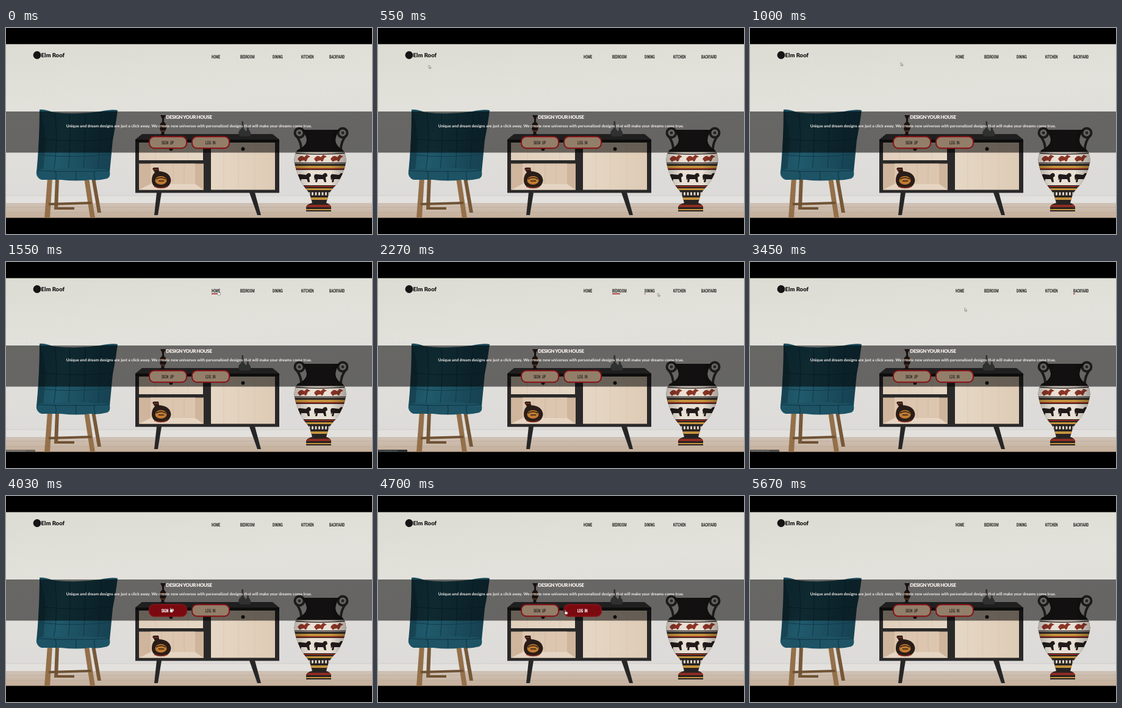
An HTML page that plays this animation: 600 px wide and 338 px high, repeating every 5.79 s.

```html
<!DOCTYPE html>
<html lang="en">
<head>
<meta charset="utf-8">
<title>Home design landing page</title>
<style>
html, body { margin: 0; width: 100%; height: 100%; overflow: hidden; background: #000; }
svg { display: block; width: 100vw; height: 100vh; }
text { font-family: Lato, "Open Sans", sans-serif; text-rendering: geometricPrecision; }
.title, .lead { fill: #f6f0ec; text-anchor: middle; }
.title { font-size: 8px; font-weight: 900; letter-spacing: -.48px; }
.lead { font-size: 6.5px; font-weight: 700; letter-spacing: .04px; }
.brand { font-size: 9.5px; font-weight: 900; fill: #151515; }
.narrow text { font: 700 8px Roboto, "Liberation Sans", sans-serif; fill: #1c1c1b; transform: scaleX(.62); transform-box: fill-box; }
.btn text { font-weight: 500; word-spacing: 2px; transform-origin: center; text-anchor: middle; }
.btn rect { fill: #937e69; stroke: #881115; stroke-width: 2; }
.status text { font: 3.4px "Liberation Sans", sans-serif; fill: #8b8f90; }

/* One shared clock for every moving part */
.bar, .btn rect, .btn text, .status, .cursor, .arrow, .hand {
  animation: 5790ms linear infinite;
}
.bar { fill: #a8191c; transform-box: fill-box; transform-origin: left; transform: scaleX(0); }
.bar.home { animation-name: home; }
.bar.bedroom { animation-name: bedroom; }
.bar.dining { animation-name: dining; }
.bar.kitchen { animation-name: kitchen; }
.bar.backyard { animation-name: backyard; }
@keyframes home { 0%, 21.2%, 34.5%, 100% { transform: scaleX(0); } 26.4%, 29.4% { transform: scaleX(1); } }
@keyframes bedroom { 0%, 30.7%, 42%, 100% { transform: scaleX(0); } 36.6%, 36.8% { transform: scaleX(1); } 39.2% { transform: scaleX(.56); } }
@keyframes dining { 0%, 38.3%, 40.2%, 100% { transform: scaleX(0); } 39.2% { transform: scaleX(.08); } }
@keyframes kitchen { 0%, 41.8%, 47.3%, 100% { transform: scaleX(0); } 44.2% { transform: scaleX(.55); } }
@keyframes backyard { 0%, 46.3%, 60.8%, 100% { transform: scaleX(0); } 51.8%, 54.1% { transform: scaleX(1); } 59.6% { transform: scaleX(.1); } }

.signup rect { animation-name: signup; }
.signup text { animation-name: signup-ink; }
.login rect { animation-name: login; }
.login text { animation-name: login-ink; }
@keyframes signup { 0%, 66.5%, 79.6%, 100% { fill: #937e69; } 68.5%, 77.4% { fill: #7b0910; } }
@keyframes signup-ink { 0%, 66.5%, 79.6%, 100% { fill: #1c1c1b; font-weight: 500; } 68.5%, 77.4% { fill: #fff; font-weight: 800; } }
@keyframes login { 0%, 79.2%, 91.8%, 100% { fill: #937e69; } 80.9%, 89.8% { fill: #7b0910; } }
@keyframes login-ink { 0%, 79.2%, 91.8%, 100% { fill: #1c1c1b; font-weight: 500; } 80.9%, 89.8% { fill: #fff; font-weight: 800; } }

.status { animation-name: status; }
@keyframes status { 0%, 24%, 63%, 100% { opacity: 0; } 26.7% { opacity: .55; } 30%, 57% { opacity: 1; } 59.6% { opacity: .75; } }

.cursor { animation-name: travel; }
@keyframes travel {
  0%, 4.3% { transform: translate(-8px, 80px); }
  9.5% { transform: translate(83px, 61px); }
  13% { transform: translate(150px, 64px); }
  21.2% { transform: translate(336px, 50px); }
  26.8% { transform: translate(347px, 47px); }
  29.4% { transform: translate(353px, 48px); }
  30.7% { transform: translate(383px, 49px); }
  36.8% { transform: translate(408px, 49px); }
  39.2% { transform: translate(458.5px, 51px); }
  41.8% { transform: translate(484px, 49px); }
  44.2% { transform: translate(505px, 49px); }
  46.3% { transform: translate(530px, 48px); }
  51.8% { transform: translate(545px, 48px); }
  54.1% { transform: translate(530px, 54px); }
  59.6%, 60.8% { transform: translate(352px, 75.5px); }
  66.5% { transform: translate(268px, 178px); }
  71.7% { transform: translate(270px, 187px); }
  77.4% { transform: translate(296px, 188px); }
  81.2%, 81.7% { transform: translate(306.5px, 187px); }
  88.1% { transform: translate(335px, 192px); }
  89.8% { transform: translate(345px, 198px); }
  94.1%, 100% { transform: translate(385px, 316px); }
}
.arrow { animation-name: arrow; animation-timing-function: step-end; }
.hand { animation-name: hand; animation-timing-function: step-end; }
@keyframes arrow {
  0%, 29.4%, 36.8%, 39%, 44.2%, 54.1%, 77.4%, 89.8%, 100% { opacity: 1; }
  21.2%, 30.7%, 38.3%, 41.8%, 46.3%, 66.5%, 79.4% { opacity: 0; }
}
@keyframes hand {
  0%, 29.4%, 36.8%, 39%, 44.2%, 54.1%, 77.4%, 89.8%, 100% { opacity: 0; }
  21.2%, 30.7%, 38.3%, 41.8%, 46.3%, 66.5%, 79.4% { opacity: 1; }
}
</style>
</head>
<body>
<svg viewBox="0 0 600 338" preserveAspectRatio="none">
  <defs>
    <linearGradient id="wall" x2=".25" y2="1">
      <stop stop-color="#dddcd3"/><stop offset=".45" stop-color="#e2e1db"/><stop offset="1" stop-color="#dddbd9"/>
    </linearGradient>
    <linearGradient id="floor" x2="0" y2="1">
      <stop stop-color="#d0c3b7"/><stop offset="1" stop-color="#c4ae99"/>
    </linearGradient>
    <linearGradient id="cloth" x2="1" y2=".2">
      <stop stop-color="#1a4b5b"/><stop offset=".4" stop-color="#205a6c"/><stop offset="1" stop-color="#174353"/>
    </linearGradient>
    <linearGradient id="oak" x2="1" y2="0">
      <stop stop-color="#e0cfbb"/><stop offset=".5" stop-color="#e6d8c6"/><stop offset="1" stop-color="#decbb5"/>
    </linearGradient>
    <linearGradient id="shade" x2="1" y2="0">
      <stop stop-opacity=".22"/><stop offset=".3" stop-opacity="0"/><stop offset=".7" stop-opacity="0"/><stop offset="1" stop-opacity=".28"/>
    </linearGradient>
    <clipPath id="page"><path d="M0 26.500H600V311.500H0Z"/></clipPath>
    <path id="urn" d="M484 167H548Q541 174 540 184Q541 194 552 200Q559 208 557 222Q552 246 537 262Q529 270 527 280L525 287Q532 289 533 294V301H492V294Q493 289 502 287L500 280Q498 270 490 262Q478 246 473 222Q471 208 478 200Q492 194 493 184Q492 174 484 167Z"/>
    <clipPath id="urn-clip"><use href="#urn"/></clipPath>
    <path id="bull" d="M0 4Q1 0 5 1L14 2Q17-3 21 0L22 4L19 6L20 14H17L15 9L6 9L5 14H2L3 8L1 11Z"/>
    <path id="bird" d="M0 7Q5-1 11 4L15 0L21 3L17 5L14 11H12L11 9L6 10L4 12Z"/>
  </defs>

  <rect width="600" height="338"/>
  <g clip-path="url(#page)">
    <path fill="url(#wall)" d="M0 26H600V276H0Z"/>
    <path fill="#e3e1de" d="M0 275H600V288H0Z"/>
    <path stroke="#cbc8c4" stroke-width=".8" d="M0 275H600"/>
    <path fill="url(#floor)" d="M0 287.500H600V312H0Z"/>
    <path stroke="#a58f7b" stroke-width=".6" opacity=".5" d="M0 288H600M0 294H600M0 303H600"/>

    <!-- armchair -->
    <g fill="#94704a">
      <path fill="#765838" d="M81 246H87L85 298H79ZM140 246H146L156 303H150Z"/>
      <path d="M68 246H76L72 312H63ZM128 246H136L146 312H138Z"/>
      <path fill="#6f5234" d="M70 287L140 285V289L70 291ZM84 294H112V298H84Z"/>
    </g>
    <path fill="url(#cloth)" d="M55 134Q62 133 76 138Q114 143 154 137Q174 133 183 135Q180 160 175 184L170 236H50Q53 205 54 180Q56 158 55 134Z"/>
    <path fill="#143e4c" opacity=".7" d="M55 134Q64 158 65 188L61 234H51Q53 205 54 180Z"/>
    <path fill="none" stroke="#113b49" stroke-width="1.2" d="M80 139Q86 190 78 234M104 142Q107 190 102 234M130 141Q130 190 127 234M156 138Q154 190 151 234M58 182Q115 188 175 182M54 208Q115 214 172 207"/>
    <path fill="#1d5365" d="M50 234Q60 229 80 232Q115 227 148 232Q164 230 170 235Q172 244 166 247Q150 251 138 249Q116 252 90 249L58 249Q48 245 50 234Z"/>
    <path fill="none" stroke="#103644" stroke-width="1.1" d="M51 234Q110 237 170 234M80 234Q84 242 81 249M114 234Q116 243 114 250M145 234Q144 242 146 249"/>

    <!-- sideboard -->
    <path fill="#262627" d="M247 270H255L249 307H243ZM399 270H408L418 307H412Z"/>
    <path fill="#2a2929" d="M212 183H448V270.500H212Z"/>
    <path fill="#454445" d="M223 174H437L448 183H212Z"/>
    <path fill="#1c1c1d" d="M212 183H448V187H212Z"/>
    <path fill="url(#oak)" d="M218 188H323V217H218ZM336 188H441V265.500H336Z"/>
    <path stroke="#d2bfaa" stroke-width=".5" d="M357 188V265M381 188V265M408 188V265M245 188V217M298 188V217"/>
    <path fill="#cfb59c" d="M218 222.500H324V265.500H218Z"/>
    <path fill="#dcc6af" d="M237 222.500H310V256H237Z"/>
    <path fill="#e6d5c3" d="M218 265.500L237 256H310L324 265.500Z"/>
    <path stroke="#cab39a" stroke-width=".6" d="M255 223V256M274 223V256M292 223V256"/>
    <g fill="#1c1b1b"><circle cx="270.500" cy="198.500" r="3"/><circle cx="388.500" cy="198.500" r="3"/></g>

    <!-- ornaments -->
    <path fill="#3a2620" d="M253 143H262L259 149V154Q265 159 262 167L259 172L261 176H253L255 172Q250 164 253 157L256 154V149Z"/>
    <path stroke="#a8683c" stroke-width="2" d="M252 160H263M254 169H261"/>
    <g fill="#66686a">
      <path d="M386.500 153H389L389.500 165Q394 168 393 174L390 178H384L381 174Q381 168 386 165ZM395.500 160H397.500L398 167Q403 171 400 178H391Q391 171 395 167Z"/>
    </g>
    <path fill="#2a1d18" d="M240 231L242 229H250L251 235Q269 236 270.500 250Q269 263 254 263Q239 262 239 250Q239 241 244 237Z"/>
    <ellipse cx="254" cy="250" rx="9.500" ry="7" fill="#c07a31"/>
    <path fill="none" stroke="#2a1d18" stroke-width="1.500" d="M246 248Q254 243 262 248M250 251H259"/>
    <path fill="none" stroke="#8d3125" stroke-width="1.500" d="M242 232H249M243 260Q254 265 265 260"/>

    <!-- urn -->
    <g fill="none" stroke="#3f3b39" stroke-width="4">
      <circle cx="481" cy="172" r="7.500"/><circle cx="552" cy="172" r="7.500"/>
      <path d="M476 177Q485 188 484 203M557 177Q548 188 549 203"/>
    </g>
    <g fill="#57514d"><circle cx="481" cy="172" r="2.500"/><circle cx="552" cy="172" r="2.500"/></g>
    <g clip-path="url(#urn-clip)">
      <path fill="#272322" d="M468 160H562V304H468Z"/>
      <path fill="#e9e0d5" d="M468 203H562V223H468ZM468 233H562V258H468Z"/>
      <path fill="#c5933d" d="M468 226H562V230H468ZM468 263H562V266H468ZM497 278H530V282H497ZM488 297H540V299H488Z"/>
      <path fill="#8f2c22" d="M468 230H562V232H468ZM468 259H562V261H468ZM488 290H540V294H488Z"/>
      <path fill="none" stroke="#ded4c7" stroke-width="5" stroke-dasharray="3 2.500" d="M490 272H538"/>
      <g fill="#8c3526"><use href="#bird" x="478" y="208"/><use href="#bird" x="505" y="208"/><use href="#bird" x="532" y="208"/></g>
      <path fill="none" stroke="#2a2422" stroke-width="1.500" d="M470 205Q515 209 560 205M472 221.500H560"/>
      <g fill="#211c1b"><use href="#bull" x="478" y="239"/><use href="#bull" x="505" y="239"/><use href="#bull" x="532" y="239"/></g>
    </g>
    <use href="#urn" fill="url(#shade)"/>

    <rect y="137" width="600" height="67.500" fill="#000" opacity=".54"/>

    <!-- page text -->
    <circle cx="51" cy="44.500" r="6.400" fill="#151515"/>
    <text class="brand" x="57.500" y="48.100">Elm Roof</text>
    <g class="narrow">
      <text x="337" y="49.800">HOME</text>
      <text x="384" y="49.800">BEDROOM</text>
      <text x="437" y="49.800">DINING</text>
      <text x="484" y="49.800">KITCHEN</text>
      <text x="530" y="49.800">BACKYARD</text>
    </g>
    <rect class="bar home" x="337" y="51.500" width="14" height="1.500"/>
    <rect class="bar bedroom" x="384" y="51.500" width="23" height="1.500"/>
    <rect class="bar dining" x="437" y="51.500" width="16" height="1.500"/>
    <rect class="bar kitchen" x="484" y="51.500" width="20" height="1.500"/>
    <rect class="bar backyard" x="530" y="51.500" width="25" height="1.500"/>

    <text class="title" x="300" y="148.800">DESIGN YOUR HOUSE</text>
    <text class="lead" x="300" y="162.500">Unique and dream designs are just a click away. We create new universes with personalized designs that will make your dreams come true.</text>

    <g class="narrow btn signup">
      <rect x="235" y="178.200" width="61" height="19" rx="8"/>
      <text x="265" y="190.600">SIGN UP</text>
    </g>
    <g class="narrow btn login">
      <rect x="305" y="178.200" width="61" height="19" rx="8"/>
      <text x="335" y="190.600">LOG IN</text>
    </g>

    <g class="status">
      <rect y="308" width="48" height="4" fill="#2b3033"/>
      <text x="2" y="311.200">file:///site/index.html</text>
    </g>

    <g class="cursor" stroke="#333" stroke-width=".5" fill="#fff" stroke-linejoin="round">
      <path class="arrow" d="M0 0V5L1.200 4L2.100 5.900L3 5.500L2.200 3.700H3.700Z"/>
      <path class="hand" d="M0 .5Q.7-.4 1.300 .5V2.700L4.100 3.300Q4.600 3.600 4.500 4.400L3.900 7.200H.6L-1.300 4.500Q-1.200 3.700 0 4.400Z"/>
    </g>
  </g>
</svg>
</body>
</html>
```
